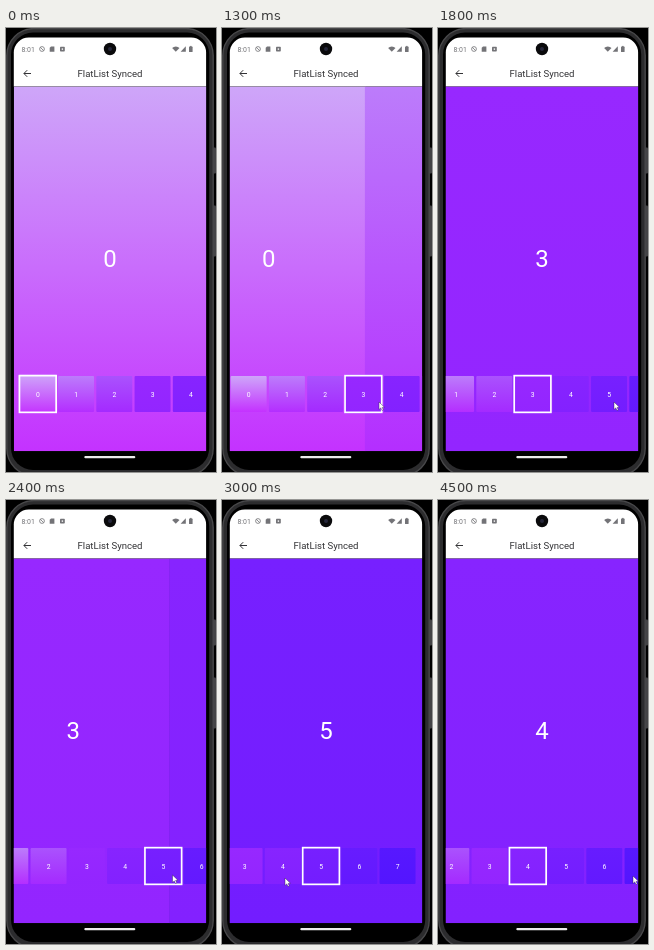
Recreate the animation shown at these times as an HTML page with a canvas. Size 210 by 444 pixels, loop 4600 ms.

```html
<!DOCTYPE html>
<html lang="en">
<head>
<meta charset="utf-8">
<title>FlatList Synced</title>
<style>
html, body { margin: 0; width: 100%; height: 100%; overflow: hidden; background: #000; }
canvas { display: block; width: 210px; height: 444px; }
</style>
</head>
<body>
<canvas id="stage"></canvas>
<script>
const LOOP = 4600, STEP = 100, COUNT = 8;
const SCREEN = { x: 7.8, y: 58.4, w: 192.3, h: 364.8 };
const THUMB = { first: 31.8, pitch: 38.25, y: 366, size: 36, active: 38.4 };
const SCROLL_MS = 250, GLIDE_MS = 200;
const FONT = 'Roboto, "Open Sans", sans-serif';

// tap: selection jumps; page and strip: start times of the two scrolls
const MOVES = [
  { tap: 1300, page: 1249, strip: 1249, to: 3, scroll: 52 },
  { tap: 2400, page: 2350, strip: 2328, to: 5, scroll: 124 },
  { tap: 3900, page: 3917, strip: 3917, to: 4, scroll: 95 }
];

// The pointer glides to each stop, arriving at the given time
const ENTRY = { x: 229, y: 420 };
const STOPS = [
  { at: 1000, x: 157, y: 374 }, { at: 1800, x: 176, y: 374 }, { at: 2000, x: 81, y: 374 },
  { at: 2200, x: 166.5, y: 375 }, { at: 3000, x: 63, y: 378 }, { at: 3200, x: 37, y: 375 },
  { at: 3500, x: 60, y: 371 }, { at: 4000, x: 81, y: 374 }, { at: 4500, x: 195, y: 376 }
];

const canvas = document.getElementById('stage');
const g = canvas.getContext('2d');
const ratio = window.devicePixelRatio || 1;
canvas.width = 210 * ratio;
canvas.height = 444 * ratio;

const clamp = v => Math.max(0, Math.min(1, v));
const mix = (a, b, p) => a + (b - a) * p;
const ease = p => (1 - Math.cos(Math.PI * clamp(p))) / 2;

function box(x, y, w, h, fill) {
  g.fillStyle = fill;
  g.fillRect(x, y, w, h);
}

function round(x, y, w, h, r, fill, stroke, width) {
  g.beginPath();
  g.roundRect(x, y, w, h, r);
  g.fillStyle = fill;
  g.fill();
  if (stroke) { g.strokeStyle = stroke; g.lineWidth = width; g.stroke(); }
}

function disc(x, y, r, fill) {
  g.beginPath();
  g.arc(x, y, r, 0, Math.PI * 2);
  g.fillStyle = fill;
  g.fill();
}

function poly(points, fill, stroke, width, open) {
  g.beginPath();
  points.forEach(([x, y]) => g.lineTo(x, y));
  if (!open) g.closePath();
  if (fill) { g.fillStyle = fill; g.fill(); }
  if (stroke) { g.strokeStyle = stroke; g.lineWidth = width; g.stroke(); }
}

function label(str, x, y, size, color, weight = 400, align = 'center') {
  g.font = `${weight} ${size}px ${FONT}`;
  g.textAlign = align;
  g.fillStyle = color;
  g.fillText(str, x, y);
}

// Violet to blue along the list; the first pages are paler at the top
function shade(i, y, h) {
  const r = 196 - 16.2 * i, green = 50 - 4.2 * i, pale = clamp(1 - i / 3);
  const fill = g.createLinearGradient(0, y, 0, y + h);
  fill.addColorStop(0, `rgb(${r + 4 + 6 * pale}, ${green + 3 + 113 * pale}, ${255 - 6 * pale})`);
  fill.addColorStop(1, `rgb(${r}, ${green}, 255)`);
  return fill;
}

function drawPhone() {
  box(0, 0, 210, 444, '#000');
  round(207, 119.5, 3, 26, 1, '#444446');
  round(207, 177.5, 3, 51, 1, '#444446');
  round(0.8, 0.6, 206.4, 447, 27, '#2c2c2e', '#48484a', 1.4);
  round(5, 4.5, 198.2, 437.5, 22, '#000');
  round(SCREEN.x, 9.5, SCREEN.w, 49, [15, 15, 0, 0], '#fff');
  round(78.3, 428.1, 51, 2.2, 1.1, '#ececec');
}

function drawStatus() {
  const gray = '#737377';
  label('8:01', 15.5, 23.6, 6.9, gray, 400, 'left');

  g.strokeStyle = gray;
  g.lineWidth = 0.8;
  g.beginPath();
  g.arc(36, 21, 2.4, 0, Math.PI * 2);
  g.moveTo(34.3, 19.3);
  g.lineTo(37.7, 22.7);
  g.stroke();

  poly([[45, 18.4], [48.4, 18.4], [48.4, 23.7], [43.7, 23.7], [43.7, 19.8]], gray);
  round(54, 18.7, 4.8, 4.8, 0.7, gray);
  box(55.7, 20.4, 1.4, 1.4, '#fff');

  g.beginPath();
  g.moveTo(169.8, 23.8);
  g.arc(169.8, 23.8, 5.2, -Math.PI * 0.75, -Math.PI * 0.25);
  g.fillStyle = gray;
  g.fill();
  poly([[179.8, 18.2], [179.8, 23.8], [174.6, 23.8]], gray);
  round(183, 18.6, 3.6, 5.4, 0.6, gray);
  box(184.1, 17.9, 1.4, 1, gray);

  disc(104, 21, 6.2, '#0a0a0c');
  disc(104, 21, 2, '#25263a');
}

function drawHeader() {
  const ink = '#333336';
  poly([[25, 45.5], [18, 45.5]], null, ink, 1, true);
  poly([[21.2, 42.2], [17.9, 45.5], [21.2, 48.8]], null, ink, 1, true);
  label('FlatList Synced', 104, 49, 9.6, ink);
}

function drawPages(offset) {
  for (let i = 0; i < COUNT; i++) {
    const x = SCREEN.x + (i - offset) * SCREEN.w;
    box(x, SCREEN.y, SCREEN.w + 0.5, SCREEN.h, shade(i, SCREEN.y, SCREEN.h));
    label(i, x + SCREEN.w / 2, 239, 24, '#fff');
  }
}

function drawStrip(scroll, active) {
  for (let i = 0; i < COUNT; i++) {
    const x = THUMB.first + i * THUMB.pitch - scroll;
    const size = i === active ? THUMB.active : THUMB.size;
    const left = x - size / 2, top = THUMB.y - size / 2;
    round(left, top, size, size, 1, shade(i, top, size));
    if (i === active) {
      g.strokeStyle = '#fff';
      g.lineWidth = 1.7;
      g.strokeRect(left + 0.85, top + 0.85, size - 1.7, size - 1.7);
    }
    label(i, x, 368.5, 6.8, '#fff');
  }
}

function drawPointer(t) {
  let { x, y } = ENTRY;
  for (const stop of STOPS) {
    const p = clamp((t - stop.at) / GLIDE_MS + 1);
    x = mix(x, stop.x, p);
    y = mix(y, stop.y, p);
  }
  const shape = [[0, 0], [0, 7.4], [1.8, 5.9], [3, 8.5], [4.3, 7.8], [3.1, 5.4], [5.4, 5.2]];
  poly(shape.map(([dx, dy]) => [x + dx, y + dy]), '#fff', 'rgba(40,20,70,.7)', 0.6);
}

function draw(t) {
  let page = 0, scroll = 0, active = 0;
  for (const m of MOVES) {
    page = mix(page, m.to, ease((t - m.page) / SCROLL_MS));
    scroll = mix(scroll, m.scroll, ease((t - m.strip) / SCROLL_MS));
    if (t >= m.tap) active = m.to;
  }
  g.setTransform(ratio, 0, 0, ratio, 0, 0);
  drawPhone();
  drawStatus();
  drawHeader();
  g.save();
  g.beginPath();
  g.rect(SCREEN.x, SCREEN.y, SCREEN.w, SCREEN.h);
  g.clip();
  drawPages(page);
  drawStrip(scroll, active);
  drawPointer(t);
  g.restore();
}

const start = performance.now();
function tick() {
  const t = (performance.now() - start + 5) % LOOP;
  draw(Math.floor(t / STEP) * STEP);
  requestAnimationFrame(tick);
}
tick();
</script>
</body>
</html>
```
